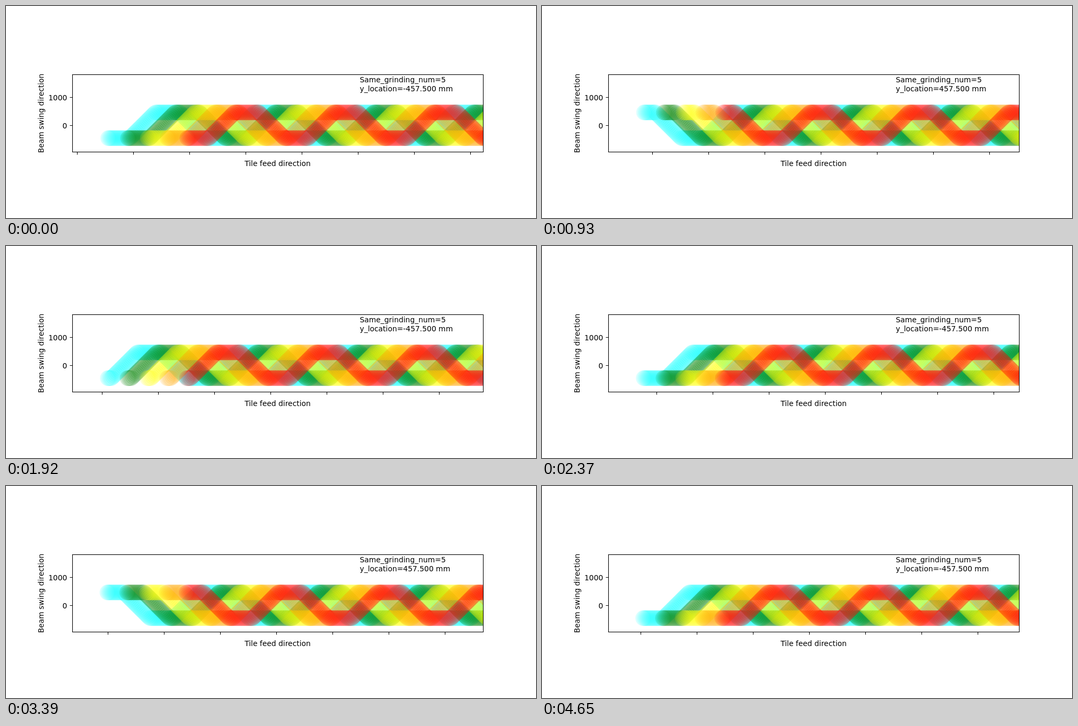
An HTML page with a canvas that plays this animation: 1000x400 px, repeating every 4680 ms.

```html
<!DOCTYPE html>
<html lang="en">
<head>
<meta charset="utf-8">
<title>Beam swing</title>
<style>
  html, body { margin: 0; width: 100%; height: 100%; overflow: hidden; background: #fff; }
  canvas, svg { position: absolute; left: 0; top: 0; width: 1000px; height: 400px; }
  text { font: 13.89px "DejaVu Sans", sans-serif; fill: #000; white-space: pre; }
  .line { fill: none; stroke: #000; stroke-width: 1.1; }
</style>
</head>
<body>
<canvas id="trail" width="1000" height="400"></canvas>
<svg viewBox="0 0 1000 400">
  <rect class="line" x="125.5" y="129.5" width="775" height="146"/>
  <path class="line" d="M120.5 172.5H125M120.5 225.5H125"/>
  <path class="line" id="ticks"/>
  <text x="115.3" y="177.7" text-anchor="end">1000</text>
  <text x="115.3" y="230.7" text-anchor="end">0</text>
  <text x="512.5" y="302" text-anchor="middle">Tile feed direction</text>
  <text transform="translate(71.3 202.5) rotate(-90)" text-anchor="middle">Beam swing direction</text>
  <text x="667.5" y="144">Same_grinding_num=5</text>
  <text x="667.5" y="161" id="place"></text>
</svg>
<script>
const STEP_MS = 30, STEPS = 156;
const COLORS = ['#00ffff', '#008000', '#ffff00', '#ffa500', '#ff0000'];
const BOX = { left: 125, right: 900.5, top: 129, bottom: 275.5 };

// Swing: rise, dwell, fall, dwell. Heights in mm, times in steps.
const CYCLE = 78, REACH = 457.5, SPEED = 45, RISE = 5 / 3, FALL = 40 + 13 / 15;

// Screen measures in px.
const SCALE = 0.053, ZERO_Y = 225.1, RADIUS = 14.3;
const FEED = 2.4, HEAD_GAP = 37.35, TICK_GAP = 106, TICK_FEED = 2.387;

const ctx = document.getElementById('trail').getContext('2d');
const ticks = document.getElementById('ticks');
const place = document.getElementById('place');

function swing(step) {
  const p = ((step % CYCLE) + CYCLE) % CYCLE;
  return p < FALL
    ? Math.min(REACH, -REACH + SPEED * Math.max(0, p - RISE))
    : Math.max(-REACH, REACH - SPEED * (p - FALL));
}

function drawTrails(step) {
  const head = 193.1 - 0.0135 * step;
  ctx.clearRect(0, 0, 1000, 400);
  ctx.save();
  ctx.beginPath();
  ctx.rect(BOX.left, BOX.top, BOX.right - BOX.left, BOX.bottom - BOX.top);
  ctx.clip();
  ctx.fillStyle = '#fff';
  ctx.fillRect(0, 0, 1000, 400);
  ctx.globalAlpha = 0.1;
  ctx.lineWidth = 1.39;
  COLORS.forEach((color, i) => {
    const start = head + i * HEAD_GAP;
    const count = Math.ceil((BOX.right + RADIUS + 1 - start) / FEED);
    ctx.fillStyle = ctx.strokeStyle = color;
    // Oldest mark first, the head itself last.
    for (let age = count; age >= 0; age--) {
      ctx.beginPath();
      ctx.arc(start + age * FEED, ZERO_Y - swing(step - age) * SCALE, RADIUS, 0, 2 * Math.PI);
      ctx.fill();
      ctx.stroke();
    }
  });
  ctx.restore();
}

function drawTicks(step) {
  let d = '';
  const first = (134.3 + TICK_FEED * step - BOX.left) % TICK_GAP + BOX.left;
  for (let x = first; x <= BOX.right + 0.5; x += TICK_GAP) {
    d += `M${Math.floor(x) + 0.5} 276V280.5`;
  }
  ticks.setAttribute('d', d);
}

let shown = -1;
function render() {
  const step = Math.floor(performance.now() / STEP_MS) % STEPS;
  if (step !== shown) {
    shown = step;
    drawTrails(step);
    drawTicks(step);
    place.textContent = `y_location=${swing(step).toFixed(3)} mm`;
  }
  requestAnimationFrame(render);
}
render();
</script>
</body>
</html>
```
